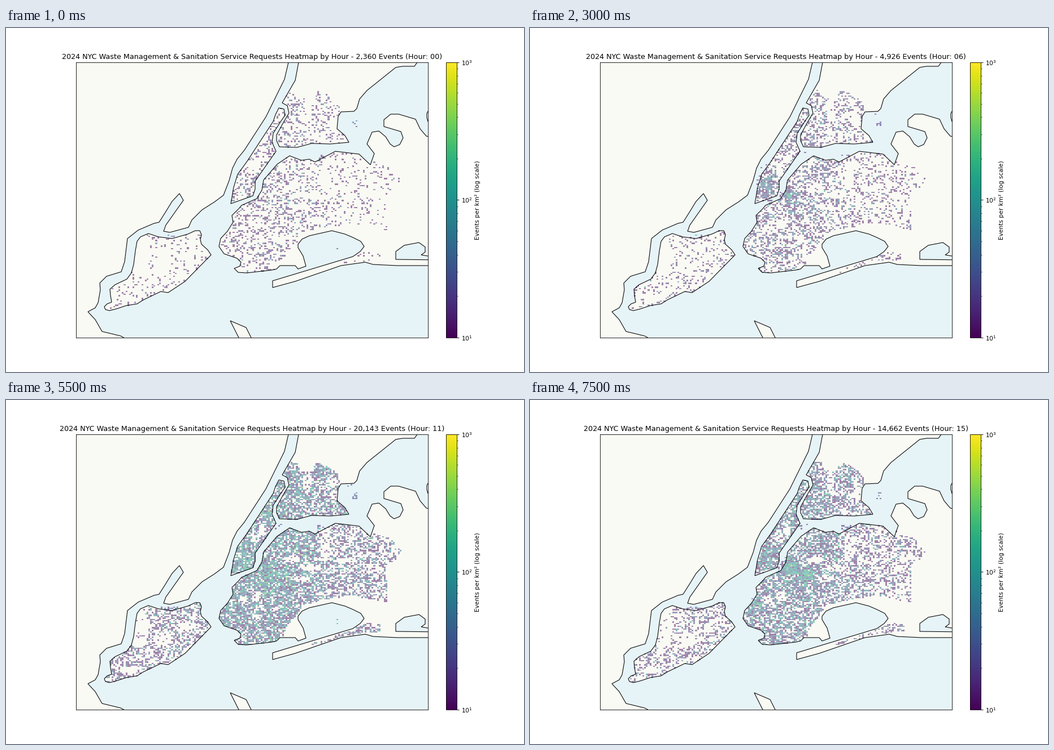
Animation, 917 px wide and 611 px high, one loop 8 s. Source, as a matplotlib script:

```python
import numpy as np
import matplotlib.pyplot as plt
from matplotlib.animation import FuncAnimation
from matplotlib.cm import ScalarMappable
from matplotlib.colors import LogNorm
from matplotlib.patches import Polygon
from matplotlib.path import Path

W, H = 917, 611
DPI = W / 12
LEFT, RIGHT, TOP, BOTTOM = 124.4, 746.9, 61.1, 549.9
BINS = 200
CELL_KM2 = 0.082
LAND, SEA = "#fafaf4", "#e6f3f7"

plt.rcParams["font.family"] = "DejaVu Sans"

# Coastlines, in stage pixels
JERSEY = [
    (124, 40), (505, 40), (500, 61), (493, 91), (460, 158), (422, 217),
    (409, 233), (401, 249), (395, 271), (385, 297), (369, 309), (347, 323),
    (329, 341), (323, 354), (290, 363), (279, 361), (283, 350), (314, 306),
    (307, 294), (294, 308), (283, 326), (271, 345), (262, 347), (234, 359),
    (215, 374), (210, 415), (204, 433), (178, 441), (166, 453), (167, 465),
    (163, 488), (158, 497), (145, 504), (158, 518), (170, 539), (203, 547),
    (214, 553), (100, 570), (100, 40)]
STATEN = [
    (252, 365), (270, 371), (294, 374), (322, 366), (335, 360), (343, 360),
    (346, 367), (344, 376), (346, 384), (357, 394), (363, 403), (317, 450),
    (287, 470), (274, 468), (243, 483), (232, 490), (213, 493), (195, 499),
    (183, 502), (176, 500), (174, 495), (179, 490), (187, 487), (185, 475),
    (184, 464), (193, 456), (214, 446), (222, 435), (226, 420), (229, 396),
    (232, 379), (238, 371)]
MANHATTAN = [
    (398, 312), (403, 283), (410, 260), (426, 238), (473, 166), (477, 154),
    (483, 142), (492, 144), (494, 155), (487, 165), (473, 187), (471, 203),
    (478, 219), (441, 272), (441, 286), (437, 298)]
BRONX = [
    (520, 40), (518, 61), (512, 93), (489, 133), (498, 138), (501, 151),
    (491, 168), (479, 190), (479, 200), (484, 211), (515, 212), (541, 205),
    (574, 206), (607, 203), (600, 191), (586, 179), (588, 157), (593, 149),
    (616, 148), (621, 143), (626, 126), (639, 111), (690, 70), (702, 68),
    (723, 68), (728, 61), (735, 40)]
NORTH_SHORE = [
    (377, 388), (380, 374), (392, 361), (402, 345), (400, 333), (412, 321),
    (417, 315), (444, 303), (453, 288), (456, 270), (480, 242), (502, 227),
    (523, 235), (537, 233), (547, 238), (583, 219), (625, 224), (645, 243),
    (652, 223), (639, 206), (648, 185), (660, 183), (672, 193), (680, 206),
    (687, 211), (697, 207), (703, 195), (699, 184), (669, 175), (669, 163),
    (681, 153), (695, 153), (725, 162), (733, 179), (744, 192), (770, 197)]
SOUTH_SHORE = [
    (770, 408), (747, 405), (735, 403), (742, 398), (742, 389), (731, 381),
    (705, 386), (690, 397), (690, 411), (770, 412), (770, 422), (692, 422),
    (650, 420), (636, 416), (593, 422), (512, 450), (472, 461), (472, 449),
    (614, 406), (627, 397), (634, 388), (628, 379), (614, 372), (600, 366),
    (577, 360), (537, 369), (524, 375), (517, 384), (517, 390), (526, 405),
    (531, 423), (517, 428), (512, 422), (485, 422), (479, 428), (470, 430),
    (426, 435), (411, 434), (404, 427), (414, 423), (416, 416), (409, 409),
    (386, 401)]
LONG_ISLAND = NORTH_SHORE + SOUTH_SHORE
SANDY_HOOK = [(397, 520), (425, 532), (440, 562), (418, 562), (412, 550)]
EAST_NECK = [(752, 144), (747, 148), (745, 152), (745, 159), (747, 166), (752, 170)]
COASTS = [JERSEY, STATEN, MANHATTAN, BRONX, LONG_ISLAND, SANDY_HOOK, EAST_NECK]

# City limits inside the larger land masses
BRONX_CITY = [
    (465, 220), (486, 130), (500, 109), (516, 109), (519, 124), (541, 128),
    (549, 112), (567, 116), (588, 130), (593, 150), (612, 208)]
QUEENS_CITY = [
    (360, 300), (500, 200), (640, 215), (652, 238), (680, 246), (700, 268),
    (690, 284), (675, 292), (675, 359), (655, 356), (612, 347), (560, 356),
    (526, 364), (512, 385), (496, 403), (487, 428), (400, 442), (360, 400)]
ROCKAWAY = [
    (540, 433), (600, 413), (640, 396), (664, 400), (664, 411), (636, 414),
    (600, 419), (545, 436)]

# Busy areas: x, y, sx, sy, height
BUSY = [
    (422, 280, 14, 18, 1.0), (466, 200, 12, 26, 0.5), (511, 155, 14, 18, 0.8),
    (495, 190, 16, 16, 0.4), (553, 128, 14, 12, 0.2), (460, 297, 12, 9, 1.1),
    (470, 325, 38, 22, 0.75), (495, 312, 16, 10, 0.5), (515, 258, 32, 20, 0.45),
    (402, 368, 14, 14, 0.45), (455, 400, 40, 28, 0.4), (600, 318, 50, 22, 0.3)]
# Parks and other quiet ground: x, y, rx, ry
QUIET = [
    (443, 246, 7, 7), (454, 231, 7, 8), (443, 348, 7, 9), (421, 355, 9, 6),
    (533, 147, 7, 20), (522, 317, 18, 5), (505, 284, 14, 7), (565, 262, 8, 26),
    (578, 148, 6, 9), (580, 170, 9, 8), (540, 298, 20, 6), (475, 372, 7, 4),
    (234, 405, 18, 36), (276, 425, 16, 13), (316, 405, 9, 8), (215, 480, 15, 6),
    (600, 285, 18, 5), (655, 300, 9, 5), (445, 372, 4, 3), (238, 372, 12, 10)]
# Small islands and piers: x, y, half width, half height, weight
ISLETS = [
    (617, 170, 4, 6, 0.35), (560, 229, 8, 7, 0.3), (586, 394, 2, 5, 0.3),
    (290, 370, 15, 4, 0.35), (485, 223, 8, 6, 0.06), (605, 152, 8, 2, 0.08)]

TOTALS = [2360, 1424, 1073, 857, 968, 1638, 4926, 12705,
          19318, 22562, 21874, 20143, 18006, 16735, 15820, 14662]
# Bursts in single hours: x, y, sx, sy, share of the events
BURSTS = {
    2: [(480, 306, 7, 2.5, 0.07), (496, 314, 6, 2.5, 0.06), (464, 299, 4, 2.5, 0.03)],
    4: [(573, 261, 0.8, 0.6, 0.09)],
    6: [(420, 275, 7, 12, 0.04), (460, 296, 7, 5, 0.03)],
    7: [(415, 284, 4, 6, 0.07), (429, 262, 4, 5, 0.04), (460, 296, 8, 6, 0.06),
        (509, 142, 5, 8, 0.02), (228, 469, 5, 3, 0.008), (258, 422, 3, 4, 0.008)],
    8: [(419, 280, 7, 10, 0.04), (460, 296, 8, 6, 0.03)],
    9: [(416, 284, 5, 7, 0.02), (460, 297, 8, 6, 0.02), (181, 493, 3, 4, 0.003)],
    12: [(418, 288, 6, 6, 0.025), (460, 296, 8, 6, 0.03), (492, 310, 7, 6, 0.015)],
    15: [(490, 309, 8, 6, 0.025), (460, 296, 8, 6, 0.02), (403, 366, 5, 6, 0.01)]}

xe = np.linspace(LEFT, RIGHT, BINS + 1)
ye = np.linspace(TOP, BOTTOM, BINS + 1)
X, Y = np.meshgrid((xe[1:] + xe[:-1]) / 2, (ye[1:] + ye[:-1]) / 2)


def inside(points):
    cells = np.column_stack([X.ravel(), Y.ravel()])
    return Path(points + points[:1]).contains_points(cells).reshape(X.shape)


def bump(x, y, sx, sy):
    return np.exp(-((X - x) / sx) ** 2 / 2 - ((Y - y) / sy) ** 2 / 2)


def base_density():
    queens = inside(LONG_ISLAND) & inside(QUEENS_CITY)
    east = 1 / (1 + np.exp((X - 560) / 14))
    density = (0.6 * inside(MANHATTAN)
               + 0.5 * (inside(BRONX) & inside(BRONX_CITY))
               + queens * (0.22 + 0.33 * east))
    density *= 1 + 1.6 * sum(h * bump(x, y, sx, sy) for x, y, sx, sy, h in BUSY)
    density += 0.24 * inside(STATEN) + 0.25 * inside(ROCKAWAY)
    for x, y, rx, ry in QUIET:
        density[((X - x) / rx) ** 2 + ((Y - y) / ry) ** 2 < 1] *= 0.07
    for x, y, rx, ry, weight in ISLETS:
        spot = (abs(X - x) < rx) & (abs(Y - y) < ry)
        density[spot] = np.maximum(density[spot], weight)
    density *= np.random.default_rng(24).lognormal(0, 0.5, X.shape)
    return density / density.sum()


BASE = base_density()


def hour_counts(hour):
    rng = np.random.default_rng(100 + hour)
    total = TOTALS[hour]
    shape = 0.4 + 0.17 * total * BASE
    p = BASE * rng.gamma(shape) / shape
    p /= p.sum()
    for x, y, sx, sy, share in BURSTS.get(hour, []):
        b = bump(x, y, sx, sy) * rng.gamma(1.5, size=X.shape)
        p = p * (1 - share) + share * b / b.sum()
    p /= p.sum()
    return rng.multinomial(total, p.ravel()).reshape(X.shape)


def heat(hour):
    return np.ma.masked_equal(hour_counts(hour) / CELL_KM2, 0)


def box(x0, y0, x1, y1):
    return [x0 / W, 1 - y1 / H, (x1 - x0) / W, (y1 - y0) / H]


fig = plt.figure(figsize=(12, (H + 1e-6) / DPI), dpi=DPI, facecolor="white")
ax = fig.add_axes(box(LEFT, TOP, RIGHT, BOTTOM), facecolor=SEA)
ax.set(xlim=(LEFT, RIGHT), ylim=(BOTTOM, TOP), xticks=[], yticks=[])

for coast in COASTS:
    ax.add_patch(Polygon(coast, fc=LAND, ec="none", zorder=0.5))
    ax.add_patch(Polygon(coast, fc="none", ec="black", lw=1, zorder=1.5))

norm = LogNorm(10, 1000)
mesh = ax.pcolormesh(xe, ye, heat(0), cmap="viridis", norm=norm, alpha=0.5, zorder=1)
title = ax.set_title("", fontsize=12)

cax = fig.add_axes(box(779.4, TOP, 798.2, BOTTOM))
bar = fig.colorbar(ScalarMappable(norm, "viridis"), cax=cax)
bar.set_label("Events per km² (log scale)")


def update(hour):
    mesh.set_array(heat(hour))
    title.set_text("2024 NYC Waste Management & Sanitation Service Requests "
                   f"Heatmap by Hour - {TOTALS[hour]:,} Events (Hour: {hour:02d})")
    return mesh, title


anim = FuncAnimation(fig, update, frames=len(TOTALS), interval=500,
                     repeat=True, repeat_delay=0, blit=False)
plt.show()
```
